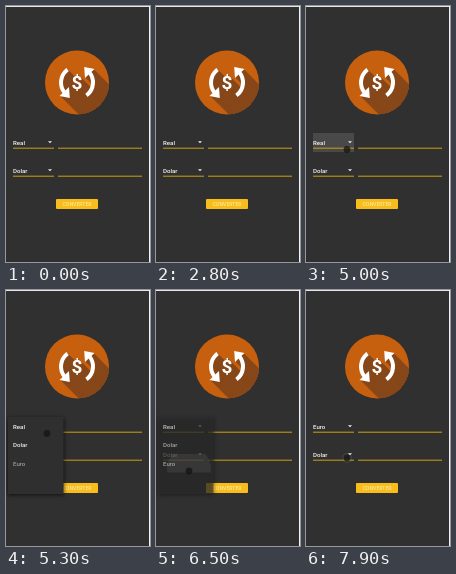
Write an HTML page with a canvas that moves like this. It is 144 by 256 pixels and loops after 8 s.

```html
<!DOCTYPE html>
<html lang="pt">
<head>
<meta charset="utf-8">
<title>Conversor</title>
<style>
html, body { margin: 0; width: 100%; height: 100%; overflow: hidden; background: #303030; }
canvas { display: block; width: 100vw; height: 100vh; }
</style>
</head>
<body>
<canvas id="stage"></canvas>
<script>
const W = 144, H = 256, LOOP = 8000, STEP = 100;
const BG = '#303030', GOLD = '#c9a013', BUTTON = '#f8bd1a', ORANGE = '#c6600f', SHADE = '#874719';
const canvas = document.getElementById('stage');
const ctx = canvas.getContext('2d');

const clamp = v => Math.max(0, Math.min(1, v));
const ramp = (t, from, to) => clamp((t - from) / (to - from));
const easeOut = p => 1 - (1 - p) ** 3;

function rect(x, y, w, h, color) {
  ctx.fillStyle = color;
  ctx.fillRect(x, y, w, h);
}

function disc(x, y, r, color) {
  ctx.fillStyle = color;
  ctx.beginPath();
  ctx.arc(x, y, r, 0, Math.PI * 2);
  ctx.fill();
}

function polygon(points, color) {
  ctx.fillStyle = color;
  ctx.beginPath();
  points.forEach(([x, y]) => ctx.lineTo(x, y));
  ctx.fill();
}

function label(str, x, y, size = 6.1, color = '#f4f4f4', weight = 500) {
  ctx.font = `${weight} ${size}px Roboto, sans-serif`;
  ctx.fillStyle = color;
  ctx.fillText(str, x, y);
}

function faded(alpha, draw) {
  if (alpha <= 0) return;
  ctx.save();
  ctx.globalAlpha = alpha;
  draw();
  ctx.restore();
}

// One curved arrow; the second is the same one turned by half a circle.
function curvedArrow(color) {
  ctx.strokeStyle = color;
  ctx.lineWidth = 4;
  ctx.beginPath();
  ctx.arc(0, 0, 16, Math.PI * 0.78, Math.PI * 1.3);
  ctx.stroke();
  polygon([[-17.5, 13.5], [-8, 4.5], [-7.2, 15.5]], color);
}

function exchangeMark(color) {
  curvedArrow(color);
  ctx.save();
  ctx.rotate(Math.PI);
  curvedArrow(color);
  ctx.restore();
  ctx.textAlign = 'center';
  label('$', 0, 6.8, 19, color, 700);
  ctx.textAlign = 'left';
}

function icon() {
  ctx.save();
  disc(71, 76.5, 32, ORANGE);
  ctx.clip();
  ctx.translate(71, 76.5);
  for (let i = 1; i < 44; i++) {
    ctx.save();
    ctx.translate(i, i);
    exchangeMark(SHADE);
    ctx.restore();
  }
  exchangeMark('#fff');
  ctx.restore();
}

function field(name, y) {
  label(name, 7, y);
  polygon([[42, y - 3.4], [46, y - 3.4], [44, y - 1.4]], '#eee');
  rect(7, y + 3, 41, 1, GOLD);
  rect(52, y + 3, 84, 1, GOLD);
}

function ripple(x, y, w, h, cx, cy, r, alpha) {
  faded(alpha, () => {
    ctx.beginPath();
    ctx.rect(x, y, w, h);
    ctx.clip();
    disc(cx, cy, r, '#8a8a8a');
  });
}

function convertButton() {
  ctx.fillStyle = BUTTON;
  ctx.beginPath();
  ctx.roundRect(50, 193, 42, 10, 1);
  ctx.fill();
  ctx.textAlign = 'center';
  label('CONVERTER', 71, 199.9, 5.2, '#fff0b8', 400);
  ctx.textAlign = 'left';
}

function popup(t) {
  const open = easeOut(ramp(t, 5000, 5300));
  const alpha = t < 6400 ? 1 : 1 - ramp(t, 6400, 6650);
  if (open <= 0 || alpha <= 0) return;
  faded(alpha, () => {
    const h = 77 * open;
    ctx.save();
    ctx.shadowColor = 'rgba(0,0,0,.65)';
    ctx.shadowBlur = 4 * canvas.width / W;
    ctx.shadowOffsetY = canvas.height / H;
    rect(2, 127, 55.5, h, '#2f2f2f');
    ctx.restore();
    ctx.beginPath();
    ctx.rect(2, 127, 55.5, h);
    ctx.clip();
    ['Real', 'Dolar', 'Euro'].forEach((name, i) => {
      const start = 5000 + i * 90;
      faded(alpha * ramp(t, start, start + 220), () => label(name, 7, 138.7 + i * 18.4));
    });
    const press = ramp(t, 6200, 6500);
    ripple(2, 164, 55.5, 18.5, 33, 179, 6 + 16 * press, press > 0 ? 0.25 * alpha : 0);
  });
}

function touch(t) {
  const spots = [
    [4900, 5500, 41, 143.5],
    [6000, 6600, 33, 181],
    [7500, 8000, 41, 168]
  ];
  for (const [from, to, x, y] of spots) {
    if (t >= from && t < to) disc(x, y, 3.4, 'rgba(20,20,20,.75)');
  }
}

function draw(t) {
  ctx.setTransform(canvas.width / W, 0, 0, canvas.height / H, 0, 0);
  rect(0, 0, W, H, BG);
  icon();

  const press = ramp(t, 4800, 5000);
  ripple(7, 127, 41, 19, 41, 143.5, 42 * press, t < 5100 ? 0.28 : 0);
  if (t >= 7900) ripple(7, 155, 41, 19, 41, 168, 5, 0.18);

  field(t < 6600 ? 'Real' : 'Euro', 138.7);
  field('Dolar', 166.7);
  convertButton();
  popup(t);
  touch(t);

  rect(0, 0, W, 1, '#e8e8e8');
  rect(143, 0, 1, H, '#f2f2f2');
}

let shown = -1;

function resize() {
  const ratio = window.devicePixelRatio || 1;
  canvas.width = Math.round(innerWidth * ratio);
  canvas.height = Math.round(innerHeight * ratio);
  shown = -1;
}

function tick() {
  const t = Math.floor((performance.now() % LOOP) / STEP) * STEP;
  if (t !== shown) {
    draw(t);
    shown = t;
  }
  requestAnimationFrame(tick);
}

addEventListener('resize', resize);
resize();
tick();
</script>
</body>
</html>
```
